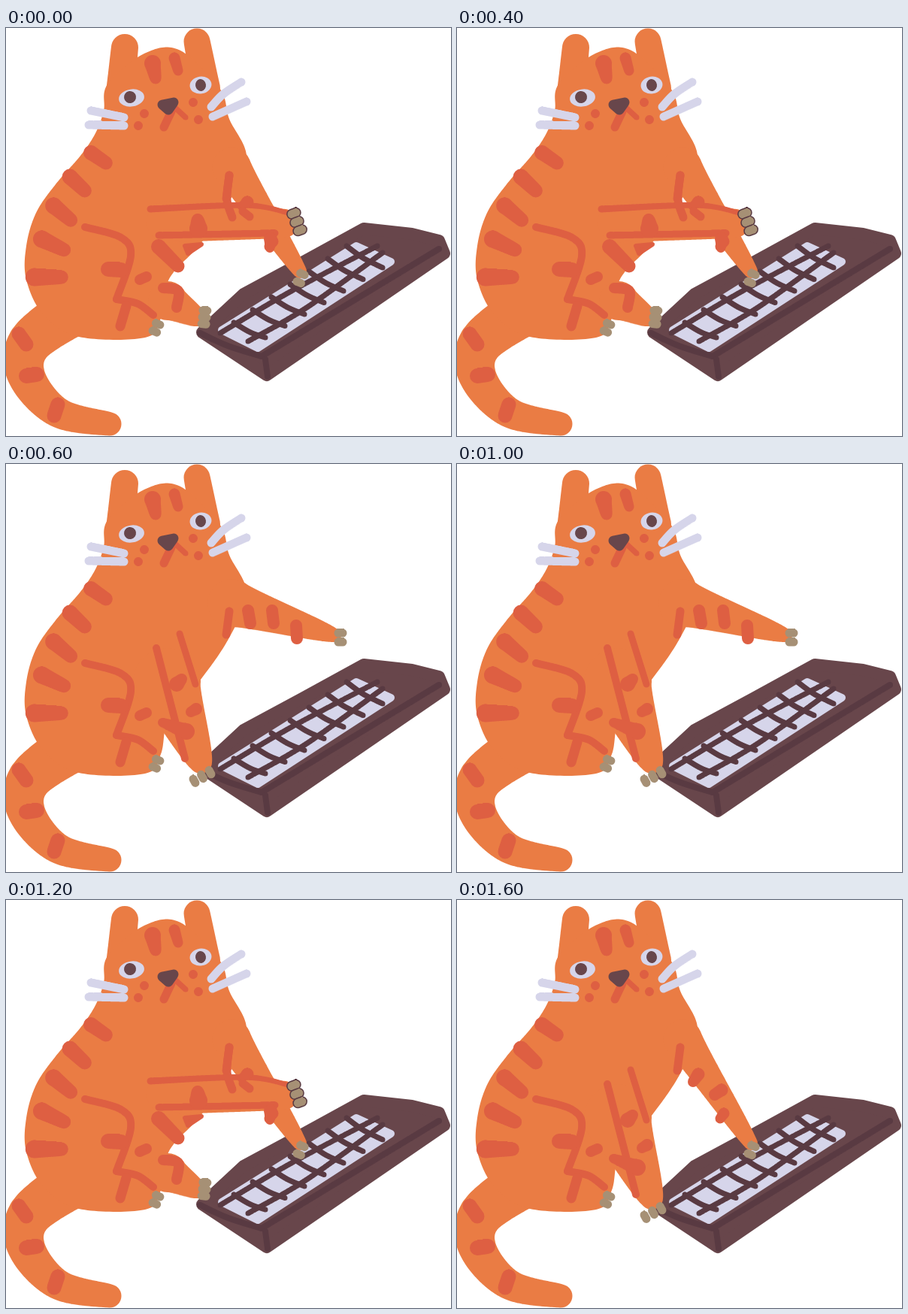
Recreate the animation shown at these times as an HTML page with a canvas. Size 592 by 543 pixels, loop 8600 ms.

```html
<!DOCTYPE html>
<html lang="en">
<head>
<meta charset="utf-8">
<title>Typing cat</title>
<style>
html, body { margin: 0; width: 100%; height: 100%; overflow: hidden; background: #fff; }
canvas { display: block; }
</style>
</head>
<body>
<canvas id="stage" width="592" height="543"></canvas>
<script>
const ctx = document.getElementById('stage').getContext('2d');
const FUR = '#ea7c44', RED = '#de5f42', PALE = '#d6d5ea',
      BROWN = '#68464b', DARK = '#593a42', TOE = '#a69075';
const STEP = 200, TYPING = 1600, LOOP = 8600;

// Point at u (0..1) on a smooth curve through x, y pairs
function along(p, u, closed) {
  const n = p.length / 2, s = u * (closed ? n : n - 1);
  const i = Math.floor(s), t = s - i;
  const at = (k, axis) =>
    p[2 * (closed ? (k + n) % n : Math.max(0, Math.min(n - 1, k))) + axis];
  return [0, 1].map(axis => {
    const [a, b, c, d] = [-1, 0, 1, 2].map(k => at(i + k, axis));
    return b + t / 2 * (c - a + t * (2 * a - 5 * b + 4 * c - d + t * (3 * (b - c) + d - a)));
  });
}

function blob(color, ...p) {
  ctx.fillStyle = color;
  ctx.beginPath();
  for (let k = 0; k < 400; k++) ctx.lineTo(...along(p, k / 400, true));
  ctx.fill();
}

// Round brush that changes width from w0 to w1
function taper(color, w0, w1, ...p) {
  ctx.fillStyle = color;
  ctx.beginPath();
  for (let k = 0; k <= 200; k++) {
    const u = k / 200, [x, y] = along(p, u), r = (w0 + (w1 - w0) * u) / 2;
    ctx.moveTo(x + r, y);
    ctx.arc(x, y, r, 0, 7);
  }
  ctx.fill();
}

const line = (color, w, ...p) => taper(color, w, w, ...p);

// Straight-sided shape with corners rounded by a border
function slab(color, border, ...p) {
  ctx.fillStyle = ctx.strokeStyle = color;
  ctx.lineWidth = border;
  ctx.lineJoin = 'round';
  ctx.beginPath();
  for (let k = 0; k < p.length; k += 2) ctx.lineTo(p[k], p[k + 1]);
  ctx.closePath();
  ctx.fill();
  ctx.stroke();
}

function oval(color, x, y, rx, ry = rx) {
  ctx.fillStyle = color;
  ctx.beginPath();
  ctx.ellipse(x, y, rx, ry, -.15, 0, 7);
  ctx.fill();
}

// Toes side by side, all pointing along the angle
function paw(x, y, angle, count, gap, outlined) {
  const c = Math.cos(angle), s = Math.sin(angle);
  for (let k = 0; k < count; k++) {
    const d = (k - (count - 1) / 2) * gap, tx = x - s * d, ty = y + c * d;
    const toe = (color, w) => line(color, w, tx - 3 * c, ty - 3 * s, tx + 3 * c, ty + 3 * s);
    if (outlined) toe(DARK, 14);
    toe(TOE, 11);
  }
}

function keyboard() {
  slab(BROWN, 16, 261, 405, 347, 462, 583, 300, 576, 283, 540, 274, 476, 267, 394, 312, 316, 354);
  line(DARK, 8, 258, 406, 295, 423, 340, 437);
  line(DARK, 8, 340, 437, 576, 294);
  line(DARK, 8, 345, 441, 348, 464);
  slab(PALE, 10, 287, 402, 335, 426, 512, 311, 466, 290);
  line(DARK, 7, 285, 406, 378, 351, 494, 290);
  line(DARK, 7, 322, 417, 400, 372, 501, 299);
  for (let k = 0; k < 7; k++) {
    const x = 303 + 25 * k, y = 392 - 17 * k;
    line(DARK, 7, x, y, x + 22, y + 13 + k / 2, x + 42 + k, y + 20 + 1.5 * k);
  }
}

function body() {
  taper(FUR, 68, 31, 85, 378, 31, 420, 28, 465, 70, 512, 138, 527);
  taper(FUR, 36, 38, 158, 26, 152, 85);
  taper(FUR, 35, 38, 254, 18, 266, 80);
  blob(FUR, 182, 35, 230, 29, 284, 80, 297, 121, 320, 172, 297, 231, 258, 288, 217, 334,
    206, 386, 185, 412, 97, 411, 50, 382, 27, 335, 27, 290, 40, 246, 66, 208,
    99, 170, 119, 140, 130, 110, 135, 75);
}

function markings() {
  for (let k = 0; k < 5; k++) {
    const x = 113 - 31 * k + 3.05 * k * k, y = 166 + 29 * k + 3.1 * k * k;
    const angle = .6 + .25 * k - .1 * k * k, size = 24 + 3 * k;
    taper(RED, 20 + k, 18, x, y, x + size * Math.cos(angle), y + size * Math.sin(angle));
  }
  line(RED, 19, 17, 407, 27, 421);
  line(RED, 20, 27, 463, 41, 461);
  line(RED, 19, 64, 516, 69, 501);
  line(RED, 10, 105, 265, 153, 279, 166, 303, 147, 361);
  line(RED, 10, 147, 361, 175, 367, 196, 382);
  line(RED, 13, 160, 370, 152, 397);
  line(RED, 20, 136, 321, 153, 322);
  line(RED, 14, 178, 335, 187, 331);
  line(RED, 11, 297, 196, 293, 227);
}

function face() {
  taper(RED, 22, 15, 195, 47, 199, 67);
  taper(RED, 15, 13, 224, 40, 229, 57);
  oval(PALE, 167, 93, 17, 11.5);
  oval(BROWN, 165, 92, 8);
  oval(PALE, 259, 76, 14.5, 11.5);
  oval(BROWN, 259, 76, 7, 8);
  line(RED, 11, 220, 111, 210, 132);
  line(RED, 7, 226, 107, 239, 119);
  slab(BROWN, 13, 208, 102, 223, 99, 216, 109);
  for (const [x, y] of [[184, 114], [176, 130], [249, 99], [256, 122]]) oval(RED, x, y, 6);
  line(PALE, 11, 113, 110, 157, 119);
  line(PALE, 11, 110, 129, 157, 130);
  line(PALE, 11, 273, 105, 289, 88, 313, 72);
  line(PALE, 11, 275, 118, 320, 98);
}

function standingLeg() {
  taper(FUR, 90, 30, 214, 290, 259, 397);
  line(RED, 10, 200, 245, 238, 392);
  line(RED, 9, 231, 226, 252, 293);
  taper(RED, 20, 14, 227, 293, 234, 286);
  taper(RED, 14, 16, 246, 330, 253, 326);
  taper(RED, 12, 22, 208, 344, 240, 356);
  paw(261, 416, 1.07, 3, 12);
}

function loweredArm() {
  taper(FUR, 52, 18, 300, 185, 391, 324);
  taper(RED, 14, 17, 314, 242, 321, 232);
  taper(RED, 16, 17, 343, 259, 352, 253);
  taper(RED, 13, 15, 350, 291, 355, 284);
}

function raisedArm() {
  taper(FUR, 64, 18, 300, 185, 437, 228);
  for (let k = 0; k < 3; k++) {
    const x = 322 + 31 * k, y = 195 + 10 * (k - 1) * k;
    line(RED, 16, x + k, y, x + 3, y + 17);
  }
  paw(445, 231, 0, 2, 12);
}

function reachingArm() {
  taper(FUR, 52, 24, 215, 363, 254, 385);
  line(RED, 14, 209, 346, 229, 350, 227, 372);
  taper(FUR, 56, 38, 215, 258, 370, 260);
  taper(RED, 20, 17, 203, 291, 229, 317);
  slab(RED, 6, 238, 290, 260, 288, 242, 300);
  taper(RED, 9, 6, 192, 241, 320, 236, 378, 247);
  line(RED, 9, 203, 276, 358, 273);
  line(RED, 11, 297, 196, 294, 228, 301, 252);
  taper(RED, 11, 14, 313, 237, 322, 231);
  line(RED, 11, 315, 244, 324, 251);
  taper(RED, 16, 24, 255, 255, 256, 267);
  taper(RED, 18, 12, 352, 281, 351, 293);
  paw(387, 258, -.35, 3, 12, true);
  paw(264, 385, .1, 3, 9);
}

function draw(pose) {
  ctx.fillStyle = '#fff';
  ctx.fillRect(0, 0, 592, 543);
  keyboard();
  body();
  if (pose === 'raise') raisedArm();
  else {
    loweredArm();
    paw(392, 333, .4, 2, 12);
  }
  if (pose === 'reach') reachingArm();
  else standingLeg();
  markings();
  paw(200, 399, .4, 2, 11);
  face();
}

let shown;
function tick() {
  const t = performance.now() % LOOP;
  const pose = t >= TYPING ? 'rest' : Math.floor(t / STEP) % 2 ? 'raise' : 'reach';
  if (pose !== shown) draw(shown = pose);
  requestAnimationFrame(tick);
}
tick();
</script>
</body>
</html>
```
